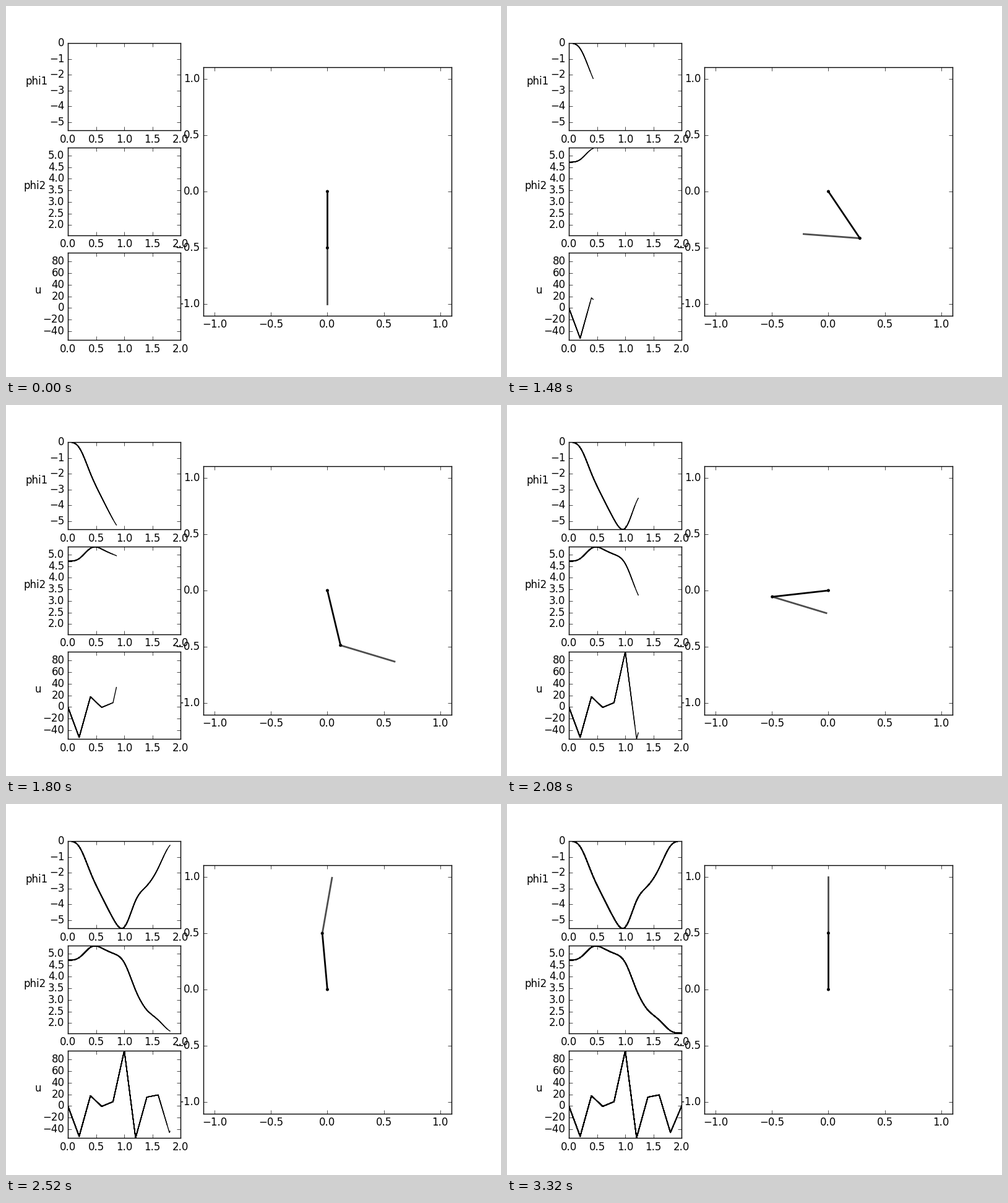
These frames come from a looping animation (800 by 600 pixels, 3.84 s). A matplotlib script:

```python
import numpy as np
import matplotlib.pyplot as plt
from matplotlib.animation import FuncAnimation
from matplotlib.patches import Circle
from matplotlib.ticker import MultipleLocator

plt.style.use("classic")
plt.rcParams.update({
    "figure.dpi": 100,
    "savefig.dpi": 100,
    "figure.facecolor": "white",
    "font.family": "DejaVu Sans",
})

FRAMES, INTERVAL = 96, 40
START = 29          # first frame of the swing-up
LAST_STEP = 38      # step at which the upright pose is reached
REDRAW_STEP = 54    # late overdraw of the finished curves
LINK = 0.5
DT = 0.01

time = np.linspace(0, 2, 201)

# Joint acceleration: piecewise linear control input
u_knots = [0, -52.5, 17.5, -0.8, 7.3, 95.5, -55.2, 15.2, 19, -46, 0]
u = np.interp(time, np.linspace(0, 2, 11), u_knots)


def integrate_twice(acc):
    speed = np.zeros_like(acc)
    pos = np.zeros_like(acc)
    for i in range(len(acc) - 1):
        a, b = acc[i], acc[i + 1]
        pos[i + 1] = pos[i] + speed[i] * DT + (a / 3 + b / 6) * DT**2
        speed[i + 1] = speed[i] + (a + b) / 2 * DT
    return pos


def clamped_spline(y, h, x):
    """Cubic spline on an even grid with zero slope at both ends."""
    y = np.asarray(y, float)
    n = len(y)
    mat = np.eye(n)
    rhs = np.zeros(n)
    for i in range(1, n - 1):
        mat[i, i - 1:i + 2] = 1, 4, 1
        rhs[i] = 3 * (y[i + 1] - y[i - 1]) / h
    m = np.linalg.solve(mat, rhs)
    i = np.clip((x / h).astype(int), 0, n - 2)
    s = x / h - i
    return ((1 + 2 * s) * (1 - s)**2 * y[i] + s * (1 - s)**2 * h * m[i]
            + s**2 * (3 - 2 * s) * y[i + 1] + s**2 * (s - 1) * h * m[i + 1])


phi1 = integrate_twice(u)
phi2 = clamped_spline(
    [1.5 * np.pi, 4.727, 4.825, 5.049, 5.267, 5.328, 5.235, 5.115, 5.01,
     4.89, 4.604, 4.05, 3.42, 2.92, 2.565, 2.345, 2.14, 1.893, 1.676,
     1.584, 0.5 * np.pi], 0.1, time)

fig = plt.figure(figsize=(8, 6))
grid = fig.add_gridspec(3, 3)

# Pendulum view comes first, so the plots cover its outer labels
view = fig.add_subplot(grid[:, 1:])
view.set_aspect("equal")
view.set_xlim(-1.1, 1.1)
view.set_ylim(-1.1, 1.1)
view.xaxis.set_major_locator(MultipleLocator(0.5))
view.yaxis.set_major_locator(MultipleLocator(0.5))
outer, = view.plot([], [], color="0.3", lw=2)
inner, = view.plot([], [], color="black", lw=2)
elbow = Circle((0, -LINK), 0.01, color="black", zorder=3)
view.add_patch(Circle((0, 0), 0.01, color="black", zorder=3))
view.add_patch(elbow)


def add_plot(row, data, tick, name, name_x):
    ax = fig.add_subplot(grid[row, 0])
    ax.set_xlim(0, 2)
    ax.set_ylim(data.min(), data.max())
    ax.xaxis.set_major_locator(MultipleLocator(0.5))
    ax.yaxis.set_major_locator(MultipleLocator(tick))
    box = ax.get_position()
    fig.text(name_x / 800, (box.y0 + box.y1) / 2, name,
             ha="center", va="bottom", fontsize=12)
    return ax


plots = [
    (add_plot(0, phi1, 1, "phi1", 49.5), phi1),
    (add_plot(1, phi2, 0.5, "phi2", 46.5), phi2),
    (add_plot(2, u, 20, "u", 52), u),
]


def sample(step):
    """Index of the newest sample at a given step."""
    return 0 if step < 0 else min(200, round(1 + 5.29 * step))


# Each step strokes the whole curve again over the earlier strokes
strokes = []
for step in range(REDRAW_STEP + 1):
    end = sample(step) + 1
    strokes.append([ax.plot(time[:end], data[:end], color="black", lw=1,
                            scalex=False, scaley=False, visible=False)[0]
                    for ax, data in plots])


def update(frame):
    step = frame - START
    newest = step if step >= REDRAW_STEP else min(step, LAST_STEP)
    for i, group in enumerate(strokes):
        for line in group:
            line.set_visible(i <= newest)

    i = sample(step)
    a = phi2[i]
    b = phi1[i] + a
    x1, y1 = LINK * np.cos(a), LINK * np.sin(a)
    x2, y2 = x1 + LINK * np.cos(b), y1 + LINK * np.sin(b)
    inner.set_data([0, x1], [0, y1])
    outer.set_data([x1, x2], [y1, y2])
    elbow.center = (x1, y1)
    return []


anim = FuncAnimation(fig, update, frames=FRAMES, interval=INTERVAL,
                     init_func=lambda: update(0), repeat=True)
plt.show()
```
